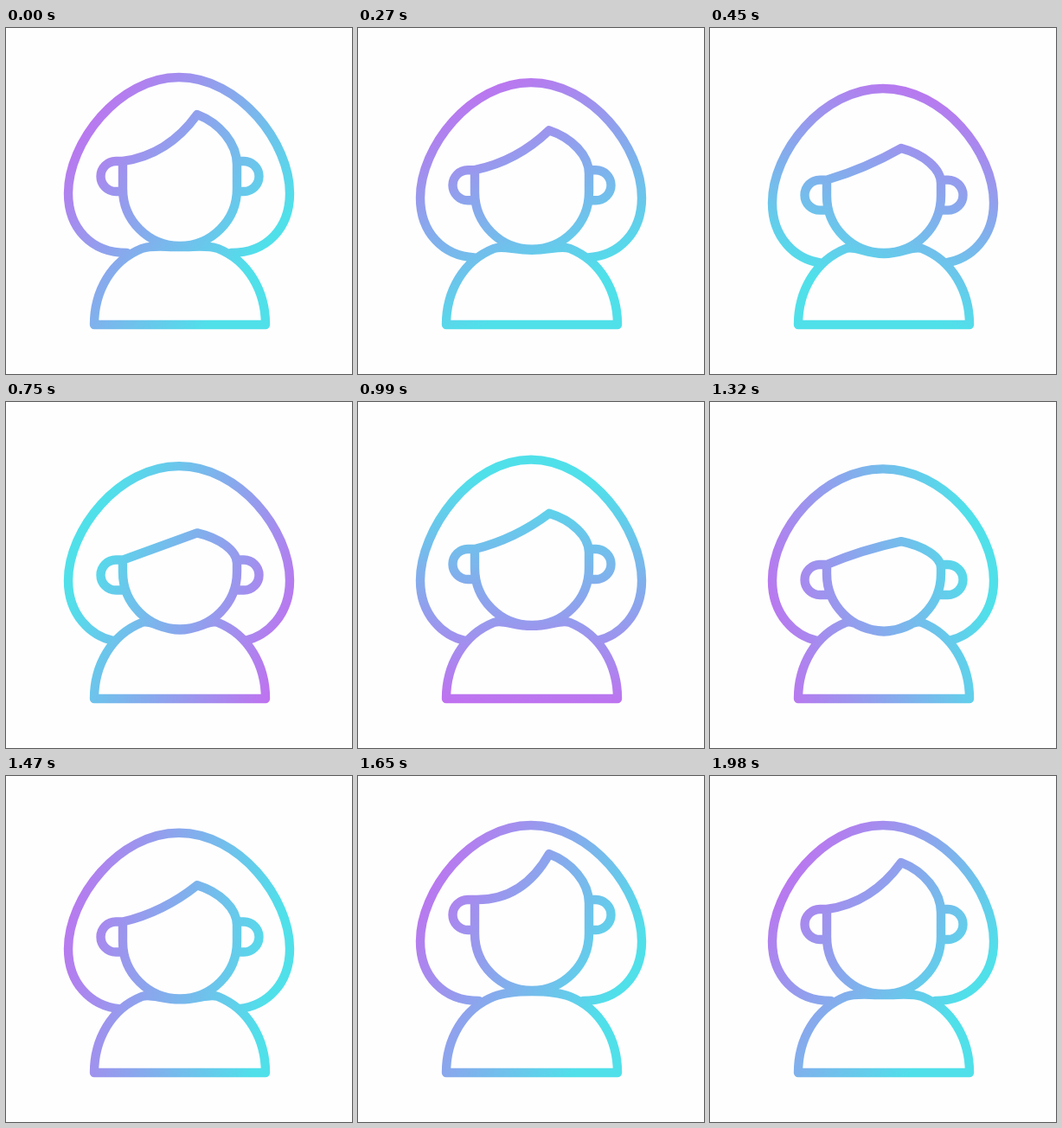
An HTML page that plays this animation: 400 px wide and 400 px high, repeating every 4.01 s.

```html
<!DOCTYPE html>
<html lang="en">
<head>
<meta charset="utf-8">
<title>Nodding avatar</title>
<style>
  html, body { margin: 0; width: 100%; height: 100%; overflow: hidden; background: #fefefe; }
  svg { display: block; width: 100%; height: 100%; }
</style>
</head>
<body>
<svg viewBox="0 0 400 400">
  <linearGradient id="tint" gradientUnits="userSpaceOnUse" x1="200" y1="32" x2="200" y2="310">
    <stop offset="0" stop-color="#c76af0"/>
    <stop offset="1" stop-color="#50e0ea"/>
  </linearGradient>
  <path id="figure" fill="none" stroke="url(#tint)" stroke-width="10.4" stroke-linecap="round" stroke-linejoin="round"/>
</svg>
<script>
const LOOP = 4010, MOVE_END = 1980, STEP = 30;
const tint = document.getElementById('tint');
const figure = document.getElementById('figure');

// Head height below rest: down, half up, down again, overshoot, rest.
const nod = [[0, 0], [690, 30], [990, 16], [1320, 34], [1650, -11], [MOVE_END, 0]];

const ease = (t, start, end) => {
  const u = Math.min(Math.max((t - start) / (end - start), 0), 1);
  return u * u * (3 - 2 * u);
};

const headDrop = t => nod.slice(1).reduce((sum, [end, value], i) => {
  const [start, previous] = nod[i];
  return sum + (value - previous) * ease(t, start, end);
}, 0);

// The hair tips fall with the first nod and spring back with the last.
const hairSway = t => 16 * (ease(t, 0, 690) - ease(t, 1320, 1650));

// One clockwise turn that slows down towards the end.
const tintAngle = t => -55 + 360 * ease(1 - (1 - t / MOVE_END) ** 1.35, 0, 1);

function hair(drop, sway) {
  const top = 57 + Math.max(drop, 0) * 0.6;
  const side = 191 + sway * 0.95;
  const tip = 260 + sway, tipHalf = 60 + sway, low = tip - sway * 0.35;
  return `M${200 - tipHalf} ${tip}C98 ${low} 72 ${side + 40} 72 ${side}
    C72 ${side - 58} 130 ${top} 200 ${top}S328 ${side - 58} 328 ${side}
    C328 ${side + 40} 302 ${low} ${200 + tipHalf} ${tip}`;
}

function head(drop, chin) {
  const ear = 154 + drop, temple = ear + 4;
  const peak = 100 + drop * (drop < 0 ? 0.9 : 1.8);
  const rise = temple - peak, sag = 20 - drop * 0.7;
  return `M135 ${ear}V${chin - 66}A66 66 0 0 0 267 ${chin - 66}V${temple}
    C267 ${temple - rise * 0.42} 247 ${peak + rise * 0.17} 221 ${peak}
    Q${178 + sag * 0.45} ${(ear + peak) / 2 + sag} 135 ${ear}Z
    M135 ${ear}H127a17.5 17.5 0 0 0 0 35H135
    M267 ${ear}H275a17.5 17.5 0 0 1 0 35H267`;
}

function body(neck) {
  return `M102 343C102 304 122 269 157 255C167 251 180 ${neck} 201 ${neck}
    S235 251 245 255C280 269 300 304 300 343Z`;
}

function draw() {
  const t = Math.min(Math.floor(performance.now() % LOOP / STEP) * STEP, MOVE_END);
  const drop = headDrop(t);
  const chin = 252 + drop * 0.37;
  figure.setAttribute('d', hair(drop, hairSway(t)) + head(drop, chin) + body(chin + 1));
  tint.setAttribute('gradientTransform', `rotate(${tintAngle(t)} 200 200)`);
  requestAnimationFrame(draw);
}
draw();
</script>
</body>
</html>
```
